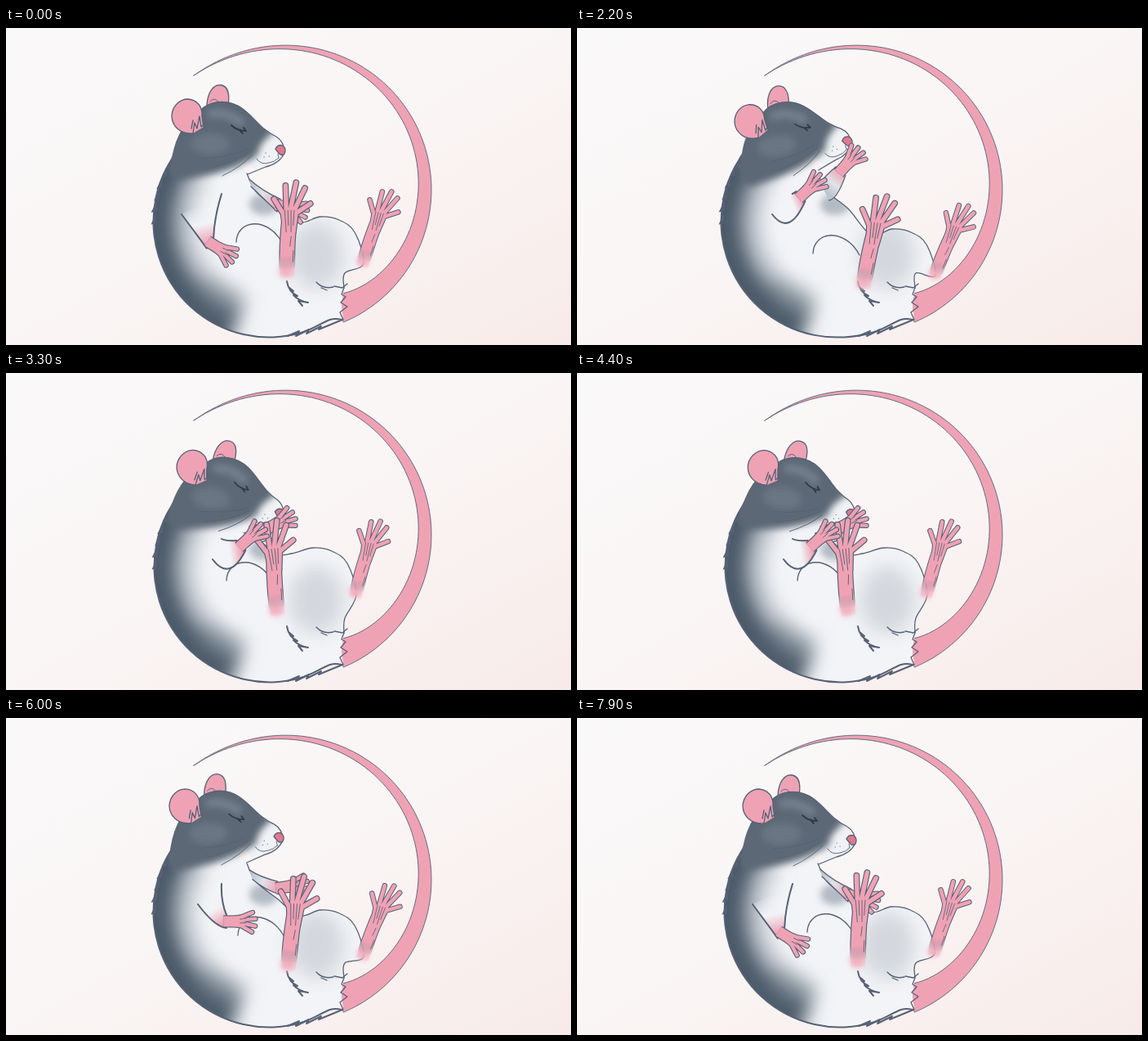
An HTML page that plays this animation: 692 by 388 pixels, repeating every 8 s.

```html
<!DOCTYPE html>
<html lang="en">
<head>
<meta charset="utf-8">
<title>Curled rat</title>
<style>
  html, body { margin: 0; width: 100%; height: 100%; overflow: hidden; background: #faf6f6; }
  svg { display: block; width: 100%; height: 100%; }
  .ink { fill: none; stroke: #566175; stroke-width: 1.3; stroke-linecap: round; stroke-linejoin: round; }
  .thin { stroke-width: .9; }
  .bold { stroke-width: 2; }
  .pink { fill: #efa2b4; }
</style>
</head>
<body>
<svg viewBox="0 0 692 388">
  <defs>
    <linearGradient id="bg" x1="0" y1="0" x2="1" y2="1">
      <stop offset="0" stop-color="#faf9fa"/>
      <stop offset=".5" stop-color="#faf5f5"/>
      <stop offset="1" stop-color="#f7ebe9"/>
    </linearGradient>
    <linearGradient id="skin" gradientUnits="userSpaceOnUse" x1="0" y1="-22" x2="0" y2="5">
      <stop offset="0" stop-color="#efa2b4"/>
      <stop offset="1" stop-color="#efa2b4" stop-opacity=".1"/>
    </linearGradient>
    <linearGradient id="edge" gradientUnits="userSpaceOnUse" x1="0" y1="-24" x2="0" y2="-4">
      <stop offset="0" stop-color="#566175"/>
      <stop offset="1" stop-color="#566175" stop-opacity="0"/>
    </linearGradient>
    <linearGradient id="nearFill" gradientUnits="userSpaceOnUse">
      <stop offset="0" stop-color="#f1f3f6" stop-opacity="0"/>
      <stop offset=".5" stop-color="#f1f3f6"/>
      <stop offset="1" stop-color="#efa2b4"/>
    </linearGradient>
    <linearGradient id="farFill" gradientUnits="userSpaceOnUse">
      <stop offset="0" stop-color="#bcc3cc"/>
      <stop offset=".45" stop-color="#e0e3e8"/>
      <stop offset="1" stop-color="#efa2b4"/>
    </linearGradient>
    <filter id="soft" filterUnits="userSpaceOnUse" x="-60" y="-60" width="820" height="520"><feGaussianBlur stdDeviation="4"/></filter>
    <filter id="softer" filterUnits="userSpaceOnUse" x="-60" y="-60" width="820" height="520"><feGaussianBlur stdDeviation="11"/></filter>
    <clipPath id="bodyClip"><path id="bodyMask"/></clipPath>
    <clipPath id="headClip">
      <path d="M240 99C252 88 274 87 290 99C306 111 312 124 331 133Q341 139 341 153Q335 166 318 170L296 179Q290 205 215 212L200 182Q204 130 226 112Z"/>
    </clipPath>
    <g id="hand"></g>
    <g id="foot"></g>
  </defs>

  <rect width="692" height="388" fill="url(#bg)"/>
  <path id="tail" class="ink pink thin"/>

  <path id="body" fill="#f3f4f7"/>
  <g clip-path="url(#bodyClip)">
    <g filter="url(#softer)" fill="none">
      <path id="shadeWide" stroke="#98a2ad" stroke-width="98" opacity=".6"/>
      <path id="shadeCore" stroke="#4b5a69" stroke-width="54"/>
      <ellipse cx="262" cy="330" rx="34" ry="15" transform="rotate(35 262 330)" fill="#75818d" opacity=".6"/>
      <ellipse cx="380" cy="278" rx="34" ry="42" fill="#c3c9d0" opacity=".65"/>
    </g>
    <ellipse cx="316" cy="216" rx="18" ry="13" fill="#a3acb7" opacity=".8" filter="url(#soft)"/>
  </g>
  <path id="fur" fill="#566175"/>
  <path id="back" class="ink bold"/>
  <path id="front" class="ink"/>
  <path class="ink" d="M414 318L411 326L416 329L410 336L418 341L409 348L413 357M418 313L412 318L402 316M380 311Q388 320 401 317M386 318L393 321"/>
  <path class="ink bold" d="M344 310Q346 323 357 328L352 327Q360 335 370 336L358 334L363 340M346 317L352 322M345 377L359 371L355 377L371 369L368 374L386 365L383 369L412 357"/>

  <g id="farFoot"><use href="#foot"/></g>

  <g id="head">
    <path class="ink pink" d="M246 94C247 79 254 68 264 70C273 72 274 82 272 95"/>
    <path class="ink thin" d="M250 90Q255 84 260 90"/>
    <g clip-path="url(#headClip)">
      <ellipse cx="318" cy="150" rx="26" ry="28" fill="#f1f2f5"/>
      <g filter="url(#soft)">
        <path fill="#5c6875" d="M188 168Q190 70 262 74Q304 84 328 128Q310 140 308 156Q272 180 210 186Z"/>
        <path d="M248 106Q270 100 290 117" stroke="#8b96a2" stroke-width="9" fill="none" opacity=".6"/>
        <ellipse cx="250" cy="142" rx="24" ry="13" fill="#74808c" opacity=".6"/>
      </g>
    </g>
    <path class="ink" d="M240 99C252 88 274 87 290 99C306 111 312 124 331 133Q341 139 341 153Q335 166 318 170L296 179"/>
    <path class="ink" style="stroke:#303a48;stroke-width:1.8" d="M276 119Q283 126 294 126M286 125L290 129M291 122L294 126"/>
    <path class="ink thin" d="M307 160Q312 168 322 165Q329 164 334 159M333 154L334 159M296 148Q274 158 240 160M298 152Q275 167 246 172M301 156Q288 170 265 181M318 153h.4M322 157h.4M316 158h.4"/>
    <path class="ink" style="fill:#e0798f" d="M330 148Q333 142 339 144Q344 148 341 154Q337 157 334 153Z"/>
    <path class="ink pink" d="M229 129C211 130 203 118 203 107C204 95 213 87 223 87C235 88 241 97 240 108Q241 116 242 121"/>
    <path class="ink" d="M229 129L231 116L234 123L237 108L239 121L243 117M227 123L229 113"/>
  </g>

  <path id="farArm" fill="url(#farFill)"/>
  <path id="farLines" class="ink"/>
  <g id="farHand"><use href="#hand"/></g>

  <path id="thigh" class="ink" d="M-63-38C-62-66-24-70-6-36"/>
  <g id="nearFoot"><use href="#foot"/></g>

  <path id="nearArm" fill="url(#nearFill)"/>
  <path id="nearLines" class="ink bold"/>
  <g id="nearHand"><use href="#hand"/></g>
</svg>
<script>
const $ = id => document.getElementById(id);
const setD = (id, d) => $(id).setAttribute('d', d);
const rad = Math.PI / 180;
const range = n => [...Array(n).keys()];
const polar = (cx, cy, r, deg) => [cx + r * Math.cos(deg * rad), cy + r * Math.sin(deg * rad)];

// Smooth open curve through points
function curve(p) {
  let d = `M${p[0]}`;
  for (let i = 0; i < p.length - 1; i++) {
    const a = p[i - 1] || p[i], b = p[i], c = p[i + 1], e = p[i + 2] || c;
    d += `C${b[0] + (c[0] - a[0]) / 6} ${b[1] + (c[1] - a[1]) / 6} ` +
         `${c[0] - (e[0] - b[0]) / 6} ${c[1] - (e[1] - b[1]) / 6} ${c[0]} ${c[1]}`;
  }
  return d;
}

// A paw is one thick bone and a fan of digits, drawn as a dark layer under a pink one
function paw(id, bone, width, digits, digitWidth, skin, edge) {
  const layer = (color, tone, grow) =>
    `<path d="${bone}" stroke="${color}" stroke-width="${width + grow}"/>` +
    `<path d="${digits}" stroke="${tone}" stroke-width="${digitWidth + grow}" stroke-linecap="round" stroke-linejoin="round"/>`;
  $(id).innerHTML = `<g fill="none">${layer(edge, '#566175', 2.4)}${layer(skin, '#efa2b4', 0)}</g>`;
}

function buildPaws() {
  const toes = range(5).map(i => {
    const u = i / 2 - 1;
    const base = [5 + 8 * u, -75];
    const tip = polar(...base, 22 + 18 * (1 - u * u), 14 + 22 * u + 22 * u ** 3 - 90);
    return `M${4 + 5 * u} -52L${base}L${tip}`;
  }).join('');
  paw('foot', 'M-1 5Q0 -40 5 -70', 18, toes, 5.6, 'url(#skin)', 'url(#edge)');
  const tendons = range(4).map(i => `M${i * 3} ${-52 - i % 2 * 8}L${-1 + i * 4} -79`).join('');
  $('foot').innerHTML = '<circle r="9" cx="-2" cy="-3" fill="#f3b6c4" filter="url(#soft)"/>' +
    $('foot').innerHTML + `<path class="ink thin" d="${tendons}M6-46L4-34M8-28L7-14"/>`;

  const fingers = range(4).map(i => {
    const u = i / 1.5 - 1;
    const base = [20, 6 * u];
    return `M8 ${4 * u}L${base}L${polar(...base, 19 - 3 * u * u, 4 + 26 * u)}`;
  }).join('');
  paw('hand', 'M-4 0H18', 14, fingers, 4.6, '#efa2b4', '#566175');
  $('hand').innerHTML += '<path class="ink thin" d="M18-3L26-4M18 2L26 2"/>';
}

function buildTail() {
  const n = 40, outer = [], inner = [];
  for (let i = 0; i <= n; i++) {
    const s = i / n, a = 67 - 196 * s, r = 176 + 5 * s ** 8;
    const width = 24 * (1 - s) + 12 * Math.exp(-12 * s);
    outer.push(polar(345, 198, r, a));
    inner.unshift(polar(345, 198, r - width, a));
  }
  setD('tail', curve([...outer, ...inner]) + 'Z');
}

// Each joint is [x, y, angle]; everything else follows from these
const rest = {
  head: [220, 108, 0], nearFoot: [345, 300, -2], farFoot: [438, 288, 14],
  nearHand: [250, 263, 32], farHand: [334, 217, 15], sway: [0]
};
const groom = {
  head: [210, 115, -8.5], nearFoot: [352, 314, 7], farFoot: [439, 303, 18],
  nearHand: [274, 206, -43], farHand: [323, 175, -48], sway: [4]
};
const tuck = {
  head: [226, 115, 8], nearFoot: [333, 292, -8], farFoot: [429, 271, 11],
  nearHand: [288, 211, -42], farHand: [321, 190, -28], sway: [-1]
};
const nod = { ...tuck, head: [228, 118, 8.5] };
const wake = {
  head: [217, 108, -1.5], nearFoot: [347, 304, 2], farFoot: [438, 292, 16],
  nearHand: [270, 249, 0], farHand: [334, 208, -8], sway: [0]
};
const keys = [
  [0, rest], [300, rest], [1900, groom], [2500, groom], [3250, tuck],
  [4200, tuck], [5250, nod], [5900, wake], [6100, wake], [7200, rest], [8000, rest]
];

function poseAt(t) {
  const i = keys.findIndex(k => k[0] > t);
  const [t0, a] = keys[i - 1], [t1, b] = keys[i];
  const k = (1 - Math.cos(Math.PI * (t - t0) / (t1 - t0))) / 2;
  return Object.fromEntries(Object.keys(a).map(n => [n, a[n].map((v, j) => v + (b[n][j] - v) * k)]));
}

function place(id, [x, y, r], s) {
  $(id).setAttribute('transform', `translate(${x} ${y}) rotate(${r}) scale(${s})`);
}

// Lower edge: start, bend, wrist. Upper edge: start, wrist.
function arm(name, hand, low, bend, high) {
  const [x, y, r] = hand;
  const w = polar(x, y, 8, r + 90), v = polar(x, y, 8, r - 90);
  const mid = [(high[0] + v[0]) / 2 - 4, (high[1] + v[1]) / 2 + 2];
  setD(name + 'Arm', `M${low}Q${bend} ${w}L${v}Q${mid} ${high}Z`);
  setD(name + 'Lines', `M${low}Q${bend} ${w}M${high}Q${mid} ${v}`);
  const ends = { x1: (low[0] + high[0]) / 2, y1: (low[1] + high[1]) / 2, x2: x, y2: y };
  for (const n in ends) $(name + 'Fill').setAttribute(n, ends[n]);
  place(name + 'Hand', hand, .92);
}

function drawBody(p) {
  const [hx, hy] = p.farFoot;
  const ring = (from, to) => range(12).map(i => {
    const a = from + (to - from) * i / 11;
    return polar(322, 237, 141.5 + p.sway[0] * Math.max(0, -Math.cos(a * rad)), a);
  });
  const back = [...ring(222, 58), [412, 357]];
  const front = [[414, 318], [415, 300], [hx, hy], [hx - 11, hy - 38], [hx - 30, hy - 53],
    [hx - 53, hy - 57], [hx - 79, hy - 50], [332, 221], [306, 200], [295, 178]];
  const body = curve([...back, [411, 340], ...front, [270, 140]]) + 'Z';
  setD('body', body);
  setD('bodyMask', body);
  setD('back', curve(back));
  setD('front', curve(front));
  const shade = curve(ring(215, 108));
  setD('shadeWide', shade);
  setD('shadeCore', shade);
  setD('fur', range(7).map(i => {
    const [x, y] = ring(217 - i * 6, 0)[0];
    return `M${x + 4} ${y - 9}L${x - 3 - i % 2} ${y + 6}L${x + 3} ${y + 5}Z`;
  }).join(''));
}

function draw(t) {
  const p = poseAt(t);
  drawBody(p);
  const [x, y, r] = p.head;
  $('head').setAttribute('transform', `translate(${x} ${y}) rotate(${r}) translate(-220 -108)`);
  place('nearFoot', p.nearFoot, .97);
  place('farFoot', p.farFoot, .82);
  place('thigh', [p.nearFoot[0], p.nearFoot[1], 0], 1);

  const nx = p.nearHand[0], lift = (217 - p.farHand[1]) * .4;
  arm('near', p.nearHand, [nx - 35, 228], [nx - 14, 256], [264, 203]);
  arm('far', p.farHand, [300 + lift / 2, 194 + lift], [318, 211], [298, 185 + lift / 4]);
}

function tick(now) {
  draw(Math.floor(now % 8000 / 100) * 100);
  requestAnimationFrame(tick);
}
buildPaws();
buildTail();
draw(0);
requestAnimationFrame(tick);
</script>
</body>
</html>
```
